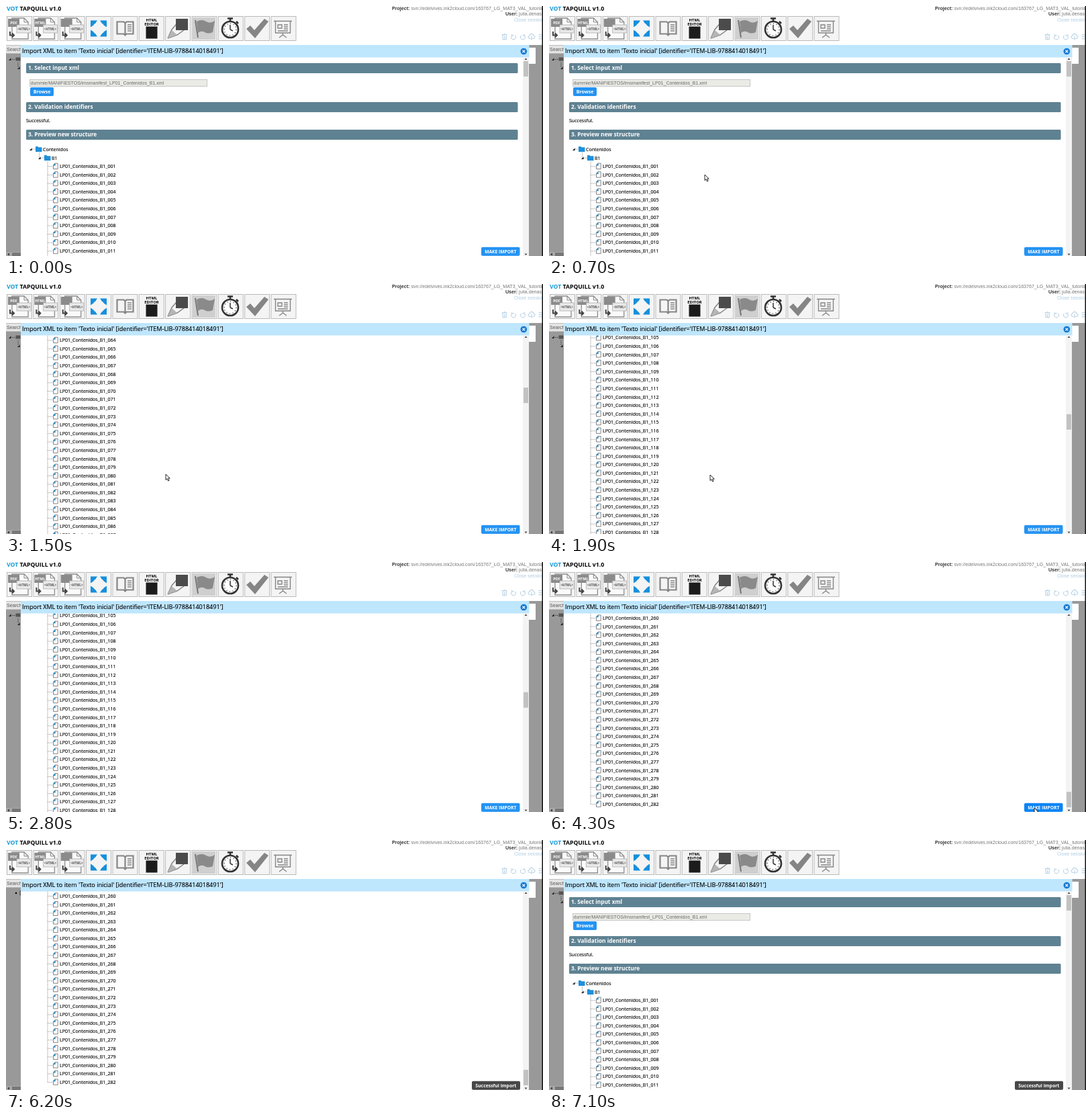
An HTML page that plays this animation: 800 by 372 pixels, repeating every 7200 ms.

```html
<!DOCTYPE html>
<html lang="en">
<head>
<meta charset="utf-8">
<title>XML import</title>
<style>
  html, body { margin: 0; width: 100%; height: 100%; overflow: hidden; background: #fff; }
  svg { display: block; }
  text { font-family: "Open Sans", "Noto Sans", sans-serif; font-size: 7.06px; fill: #000; white-space: pre; }
  .arial { font-family: "Liberation Sans", Arial, sans-serif; font-size: 7.1px; }
  .b { font-weight: 700; }
  .dark { stroke: #000; stroke-width: .14; }
  .white { fill: #fff; }
  .head { font-size: 8.3px; font-weight: 700; fill: #fff; }
  .tiny { font-size: 4.6px; font-weight: 700; }
  .line { fill: none; stroke: #858585; }
  .dots { fill: none; stroke: #8c8c8c; stroke-width: .8; stroke-dasharray: 1 .6; }
  .tools { fill: none; stroke: #adcbe0; stroke-width: 1; }
</style>
</head>
<body>
<svg id="stage" width="800" height="372" viewBox="0 0 800 372">
  <defs>
    <g id="box"><rect x=".5" y="15.5" width="37" height="36" fill="#f4f4f4" stroke="#b9b9b9"/></g>
    <g id="file">
      <path d="M8 18h18l6 6v25h-24z" fill="#fafafa" stroke="#8f8f8f" stroke-width="1.3"/>
      <path d="M26 18v6h6" class="line"/>
      <rect x="2" y="19" width="17" height="12" fill="#8b8b8b"/>
      <rect x="15" y="28" width="21" height="12" fill="#e9e9e9" stroke="#a5a5a5" stroke-width=".7"/>
      <text x="16.5" y="35.7" class="tiny" style="fill:#555">&lt;HTML&gt;</text>
      <path d="M5 38v5.500h5M8 40.500l3 3-3 3" fill="none" stroke="#444" stroke-width="2"/>
    </g>
    <g id="page">
      <path d="M72.700-4.200h4.500v8.400h-6.700v-6z" fill="#fff" stroke="#666" stroke-width=".8"/>
      <path d="M73.600-4.500v3.600h-3.500z" fill="#1683c7"/>
    </g>
    <path id="folder" d="M0-4h3.500l1 1.200h5v6.800h-9.500z" fill="#1e90dc"/>
    <path id="toggle" d="M0 2h3.600v-3.800z" fill="#222"/>
    <path id="corner" d="M0 10V0h10l-3 4.500H6.500L4.500 6.500V7z" fill="#168fdc"/>
  </defs>

  <!-- page header -->
  <text x="1" y="7.3" class="b" style="font-size:8.7px"><tspan fill="#149bd7">VOT</tspan> TAPQUILL v1.0</text>
  <text x="575" y="6" class="arial" style="fill:#777"><tspan class="b" fill="#333">Project:</tspan> svn://edelvives.ink2cloud.com/163767_LG_MAT3_VAL_tutorial</text>
  <text x="744" y="14" class="arial" style="fill:#777"><tspan class="b" fill="#333">User:</tspan> julia.denas</text>
  <text x="757" y="22.5" class="arial" style="fill:#adcbe0">Close session</text>
  <g class="tools" transform="translate(0 -.7)">
    <path d="M738.5 43.5h8M740 44v6.500h5.200v-6.500M741.500 42.500h2.500M742.600 45.500v4"/>
    <path d="M753.800 44.500a3.500 3.500 0 1 0 4.500 0M753 42.700l1.200 2.200 2.300-.8"/>
    <path d="M772.200 44.500a3.500 3.500 0 1 1-4.500 0M773 42.700l-1.200 2.200-2.300-.8"/>
    <path d="M781 49h-1a2 2 0 0 1 0-4 3 3 0 0 1 6 0 2 2 0 0 1 0 4h-1M783 45.500v5l-1.500-1.500M783 50.500l1.500-1.500"/>
    <path d="M793.500 43.500h5M793.500 46.500h5M793.500 49.500h5"/>
  </g>

  <!-- toolbar -->
  <g id="bar"></g>
  <g id="expand"></g>
  <path d="M165.500 23.500h10l2 2 2-2h10v18h-10l-2 2-2-2h-10zM177.500 25.500v18" class="line" stroke-width="2.2"/>
  <path d="M181 28h6M181 31h6M181 34h6M181 37h6" class="line" stroke-width="1.3"/>
  <text x="217" y="23" text-anchor="middle" class="b" style="font-size:5.9px">HTML</text>
  <text x="217" y="28.700" text-anchor="middle" class="b" style="font-size:5.9px">EDITOR</text>
  <rect x="208.500" y="30.500" width="17" height="18" fill="#1c1c1c"/>
  <path d="M241 48l6-13 11-13M241 48l14-5 14-10" class="line" stroke-width="1.500"/>
  <path d="M241 48l6-12 8 7z" fill="#b5b5b5"/>
  <rect x="253" y="19" width="18" height="17" fill="#4b4b4b"/>
  <rect x="278" y="17" width="34" height="33" fill="#cfcfcf"/>
  <path d="M282 21l4 26" stroke="#777" stroke-width="2"/>
  <path d="M284 23q8-4 14 0t13-1l-3 17q-7 3-12 0t-10 1z" fill="#8a8a8a"/>
  <g fill="none" stroke="#333">
    <circle cx="334" cy="35" r="12" fill="#fff" stroke-width="2.600"/>
    <path d="M330 18.500h8M334 19v4M343 23l3 3" stroke-width="2.600"/>
    <circle cx="334" cy="35" r="9" stroke-dasharray="1 3.700" stroke-width="1.500"/>
    <path d="M334 35v-7M334 35l4 2" stroke-width="1.500"/>
  </g>
  <path d="M358 34l6-5 6 7 15-17 6 4-20 25z" fill="#858585"/>
  <g class="line" stroke-width="1.400">
    <path d="M399 22.500h27M401.500 23v17h22v-17M412.500 40v4M407 47l5.500-4 5.500 4M405 28h6v5h-6zM414 28h6M414 31h6M414 34h6M405 37h15"/>
  </g>

  <!-- dimmed page behind the dialog -->
  <rect y="58" width="800" height="314" fill="#999"/>
  <rect y="58.500" width="22" height="12" fill="#e4e4e4"/>
  <text x="1" y="67" class="arial" style="fill:#555">Search...</text>
  <g id="sideTree">
    <use href="#toggle" x="4" y="79"/><path d="M9 79.500h5M18 84v7" class="dots" style="stroke:#333"/>
    <path d="M14.500 76.500h7v5h-7z" fill="#555"/>
    <use href="#toggle" x="17" y="92"/>
  </g>
  <g id="sideLoad"><circle cx="15" cy="79" r="1.300"/><path d="M22 76h-1v6h1" fill="none" stroke="#222" stroke-width=".8"/></g>
  <rect y="366" width="22" height="6" fill="#a8a8a8"/>
  <path d="M5 367.500v4l-3-2z" fill="#333"/>
  <rect x="9" y="367" width="13" height="5" fill="#777"/>
  <rect x="779" y="62" width="10" height="24" fill="#fff"/>
  <rect x="798.500" width="1.500" height="372" fill="#111"/>

  <!-- dialog -->
  <rect x="22" y="76" width="757" height="296" fill="#fff"/>
  <rect x="22" y="58" width="757.500" height="18.500" fill="#bee6fd"/>
  <text x="24" y="69.600" class="dark" style="font-size:9.050px">Import XML to item 'Texto inicial' [identifier='ITEM-LIB-9788414018491']</text>
  <circle cx="771.300" cy="67.500" r="4.800" fill="#1879cf"/>
  <path d="M769.400 65.600l3.800 3.800M773.200 65.600l-3.800 3.800" stroke="#fff" stroke-width="1.300"/>

  <svg x="22" y="76.500" width="748" height="295.500" viewBox="22 76.500 748 295.500">
    <g id="content">
      <g id="heads"></g>
      <rect x="35.500" y="109.500" width="264" height="10" fill="#ebebe6" stroke="#c6c6c6"/>
      <text x="36.500" y="117" class="arial" style="font-size:7.020px;fill:#666">dummie/MANIFIESTOS/imsmanifest_LP01_Contenidos_B1.xml</text>
      <rect x="36" y="121" width="35" height="13" rx="2" fill="#2493f2"/>
      <text x="53.500" y="130" text-anchor="middle" class="b white">Browse</text>
      <text x="30" y="173" class="dark">Successful.</text>
      <use href="#toggle" x="35" y="213"/><path d="M39 213h5M49.500 218v8h8" class="dots"/>
      <use href="#folder" x="44" y="213"/><text x="55" y="216" class="dark">Contenidos</text>
      <use href="#toggle" x="48" y="226"/>
      <use href="#folder" x="57" y="226"/><text x="68" y="228.700" class="dark">B1</text>
      <g id="rows"></g>
    </g>
  </svg>

  <rect x="770" y="76.500" width="9" height="295.500" fill="#f3f3f3"/>
  <path d="M772.500 80h4l-2-2.500zM772.500 368.500h4l-2 2.500z" fill="#444"/>
  <rect id="thumb" x="771" y="82" width="7" height="23" fill="#c2c2c2"/>

  <g id="make">
    <rect id="makeBox" x="708" y="358.700" width="57.500" height="13" rx="2"/>
    <text x="736.800" y="367.700" text-anchor="middle" class="b white" style="font-size:6.700px">MAKE IMPORT</text>
  </g>
  <g id="toast">
    <rect x="694" y="358.700" width="72" height="13" rx="2" fill="#484848"/>
    <text x="729.800" y="367.700" text-anchor="middle" class="b white" style="font-size:6.900px">Successful import</text>
  </g>
  <path id="cursor" d="M0 0v8.500l2-1.800 1.500 3.300 1.600-.7-1.500-3.200h2.700z" fill="#fff" stroke="#111" stroke-width=".9"/>
</svg>

<script>
const $ = id => document.getElementById(id);
const LOOP = 7200, TICK = 100;
const ROW = 12.59, FIRST = 238.3, COUNT = 282;

function buildBar() {
  let s = '';
  for (let i = 0; i < 11; i++) s += `<use href="#box" x="${1 + i * 39.35}"/>`;
  ['PDF', 'HTML', ''].forEach((label, i) => {
    const x = 1 + i * 39.35;
    s += `<use href="#file" x="${x}"/><text x="${x + 10.5}" y="27" text-anchor="middle" class="tiny white" style="font-size:5.4px">${label}</text>`;
  });
  $('bar').innerHTML = s;
  $('expand').innerHTML = [0, 90, 180, 270].map(a =>
    `<use href="#corner" transform="rotate(${a} 138 33.5) translate(126 21.500)"/>`).join('');
}

function buildHeads() {
  const heads = [[85, '1. Select input xml'], [143, '2. Validation identifiers'], [184, '3. Preview new structure']];
  $('heads').innerHTML = heads.map(([y, label]) =>
    `<rect x="30" y="${y}" width="732.5" height="15" rx="1.5" fill="#5f8292"/><text x="33" y="${y + 10.3}" class="head">${label}</text>`).join('');
}

function buildRows() {
  const end = FIRST + (COUNT - 1) * ROW;
  let s = `<path d="M62 231V${end}" class="dots"/>`;
  for (let i = 0; i < COUNT; i++) {
    const y = FIRST + i * ROW, num = String(i + 1).padStart(3, '0');
    s += `<path d="M62 ${y + .5}h8" class="dots"/><use href="#page" y="${y}"/><text x="80" y="${y + 2.8}" class="dark">LP01_Contenidos_B1_${num}</text>`;
  }
  $('rows').innerHTML = s;
}

// keys: [time, ...values], linear in between
function at(keys, t) {
  const i = keys.findIndex(k => k[0] > t);
  if (i < 0) return keys[keys.length - 1].slice(1);
  if (i === 0) return keys[0].slice(1);
  const a = keys[i - 1], b = keys[i], p = (t - a[0]) / (b[0] - a[0]);
  return a.slice(1).map((v, n) => v + (b[n + 1] - v) * p);
}

const scrollKeys = [[700, 0], [800, 50], [900, 148], [1000, 270], [1500, 948], [1900, 1468],
  [3500, 1468], [3600, 2100], [3700, 2900], [3800, 3416], [6599, 3416], [6600, 0]];
const cursorKeys = [[300, 228, 225], [900, 234, 264], [1500, 238, 283], [1900, 240, 284], [2200, 412, 9],
  [2300, 412, 9], [2400, 430, 2], [3400, 690, 60], [3500, 774, 206], [3800, 774, 354], [3900, 774, 354],
  [4300, 723, 366], [4700, 723, 366], [5500, 640, -12]];

const show = (id, on) => $(id).setAttribute('visibility', on ? 'visible' : 'hidden');
const within = (t, a, b) => t >= a && t < b;

function draw(now) {
  const t = Math.floor((now % LOOP) / TICK) * TICK;
  const [scroll] = at(scrollKeys, t);
  const [x, y] = at(cursorKeys, t);
  $('content').setAttribute('transform', `translate(0 ${-scroll})`);
  $('thumb').setAttribute('y', 82 + scroll * .0761);
  $('cursor').setAttribute('transform', `translate(${x} ${y})`);
  show('cursor', within(t, 300, 2500) || within(t, 3400, 5500));
  $('makeBox').setAttribute('fill', within(t, 4200, 4800) ? '#0a84f5' : '#2493f2');
  const loading = within(t, 6000, 6600);
  show('make', t < 6000);
  show('toast', t >= 6000);
  show('sideTree', !loading);
  show('sideLoad', loading);
}

function loop() {
  draw(performance.now());
  requestAnimationFrame(loop);
}

buildBar();
buildHeads();
buildRows();
loop();
</script>
</body>
</html>
```
